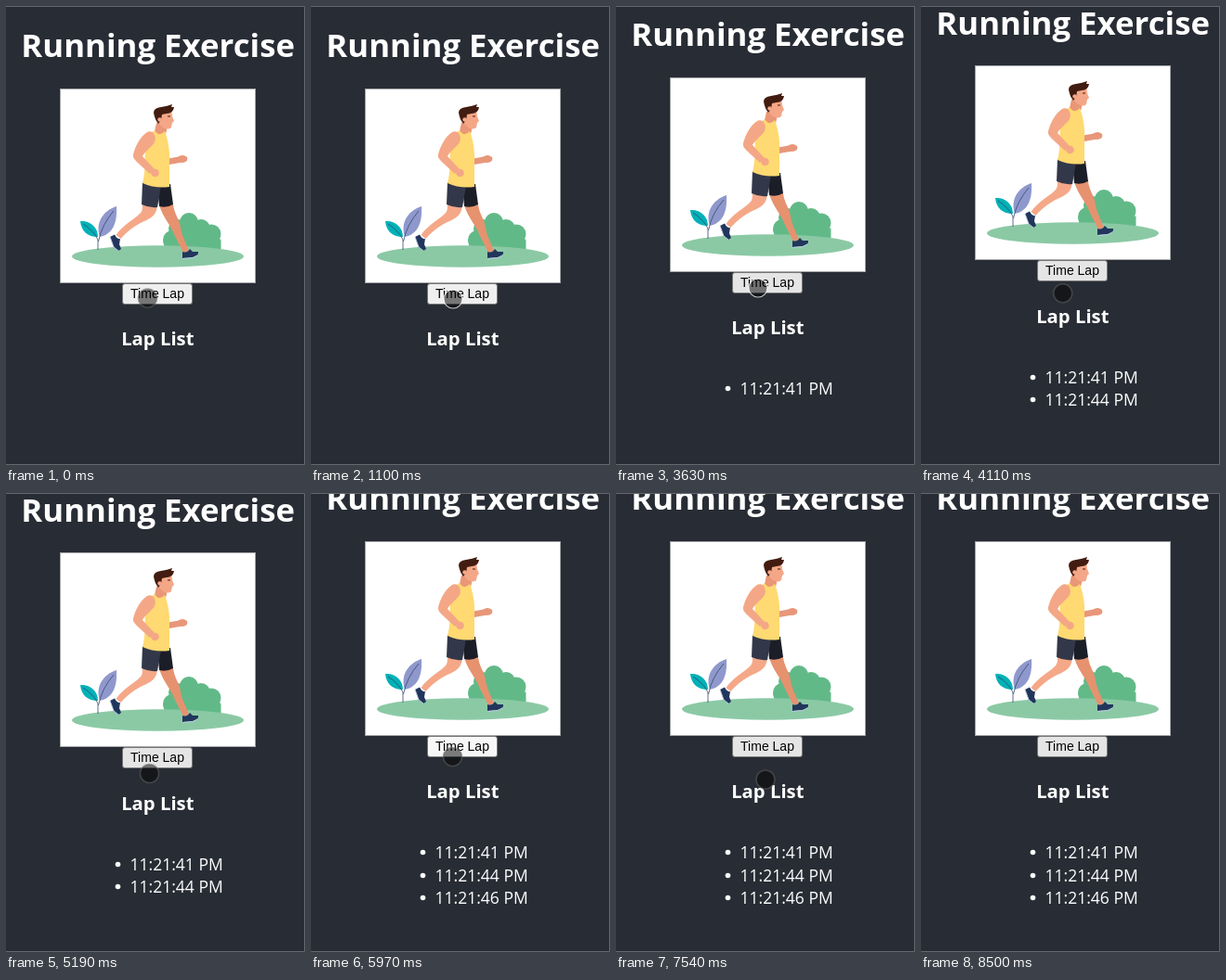
Write an HTML page that moves like this. It is 322 by 495 pixels and loops after 8990 ms.

```html
<!DOCTYPE html>
<html lang="en">
<head>
<meta charset="utf-8">
<title>Running Exercise</title>
<style>
  html, body { margin: 0; width: 100%; height: 100%; overflow: hidden; background: #282c34; }
  svg { display: block; width: 322px; height: 495px; }
  text { font-family: "Open Sans", "Noto Sans", sans-serif; fill: #fff; }
  .mid { text-anchor: middle; }
  .bold { font-weight: 700; }
  #button text { font: 14px "Liberation Sans", Arial, sans-serif; fill: #000; }
  #laps text { font-size: 17.5px; }
</style>
</head>
<body>
<svg viewBox="0 0 322 495">
  <g id="headings" class="mid bold">
    <text x="163.7" y="55" font-size="34.8">Running Exercise</text>
    <text x="163.3" y="366" font-size="20.3">Lap List</text>
  </g>

  <g id="scene">
    <rect x="58.5" y="89.5" width="210" height="209" fill="#fff" stroke="#a4a6a8"/>
    <g id="bush" fill="#62b988">
      <circle cx="179" cy="252" r="10"/><circle cx="185" cy="240" r="10"/>
      <circle cx="197" cy="233" r="10"/><circle cx="210" cy="240" r="10"/>
      <circle cx="221" cy="246" r="10.5"/>
      <path d="M169 253L185 240L197 233L210 240L221 246L231.5 252V262H171Z"/>
    </g>
    <ellipse cx="163.5" cy="270" rx="92.5" ry="11.7" fill="#8bc9a5"/>

    <g id="plant">
      <path d="M80 232C90 231 99 238 99 249C88 249 81 243 80 232Z" fill="#00b1b7"/>
      <path d="M119 216C120 232 116 246 101 249C96 234 104 221 119 216Z" fill="#8f98cc"/>
      <path d="M83 235Q95 243 99 252V263M116 221Q103 236 99.5 254" fill="none" stroke="#35496c" stroke-width=".8"/>
    </g>

    <g id="runner">
      <path d="M174 168L188 165.5" stroke="#e8977a" stroke-width="6.5" stroke-linecap="round"/>
      <path d="M185 163Q190 159 195 163Q197 168 190 169L185 168Z" fill="#e8977a"/>
      <path d="M165 215L180 214C181 224 187 230 188 239C189 247 194 256 197 264L191 266L181 246C178 237 170 230 165 215Z" fill="#e6926f"/>
      <path d="M147 213L163 215C162 226 156 229 148 232.5C138 237 131 243 123.500 251L118.500 247C126 236 138 230 143 225C147 222 147 219 147 213Z" fill="#f5a888"/>
      <path d="M163 193L177 192L180 214Q173 218 165 216Z" fill="#1b1d27"/>
      <path d="M147 190L167 194L163 217Q154 218 146 214Z" fill="#323849"/>
      <path d="M112 249L117 246.5Q120 252 123 251L122 257L124 262L121 264L116 260Z" fill="#22365c"/>
      <path d="M112 249L116 260L121 264" fill="none" stroke="#b9cbe0"/>
      <path d="M190 265Q195 267 198 262L201 265L207 265Q208 269 201 271L190 272Z" fill="#22365c"/>
      <path d="M190 272.5L201 271.5L206 269" fill="none" stroke="#b9cbe0"/>
      <path d="M162 126L174 126L173 134Q172 142 166 141Q160 139 160 135Z" fill="#e99777"/>
      <path d="M162 114L178 111L179 119L181 124L179 126L178 131Q175 134 169 131L163 125Z" fill="#f4a787"/>
      <path d="M160 134Q165 142 171 135C174 143 177 156 176 168V195Q160 197 147 191C151 176 149 164 150 153L152 140Z" fill="#ffd971"/>
      <path d="M152 136C144 141 139 152 137 160C136 164 140 167 144 171L155 181L160 176L147 162C149 157 156 153 160 147C163 140 158 133 152 136Z" fill="#f4a787"/>
      <circle cx="160.5" cy="180" r="4.3" fill="#f4a787"/>
      <path d="M159 115Q159 110 167 109Q174 108 179 106L178 109L181 109Q180 116 173 116L168 117L167 123L164 127Q160 122 159 115Z" fill="#421c10"/>
      <circle cx="165.5" cy="122.5" r="2.2" fill="#f4a787"/>
      <path d="M174 119H177" stroke="#421c10"/>
    </g>

    <g id="button">
      <rect id="face" x="125.5" y="299.5" width="75" height="22" rx="2.5" stroke="#767676"/>
      <text class="mid" x="163" y="315">Time Lap</text>
    </g>
  </g>

  <g id="laps">
    <g><circle cx="120.5" cy="-6.5" r="2.8" fill="#fff"/><text x="133.5">11:21:41 PM</text></g>
    <g><circle cx="120.5" cy="-6.5" r="2.8" fill="#fff"/><text x="133.5">11:21:44 PM</text></g>
    <g><circle cx="120.5" cy="-6.5" r="2.8" fill="#fff"/><text x="133.5">11:21:46 PM</text></g>
  </g>

  <circle id="cursor" r="10" fill="#000" fill-opacity=".5"/>
  <path d="M0 .5H321.5V494.5H0" fill="none" stroke="#65686d"/>
</svg>
<script>
const LOOP = 8990;
const $ = id => document.getElementById(id);
const lapTimes = [1300, 3750, 5970];
const hoverTimes = [1540, 3870, 6210];
const pressTimes = [1100, 3630, 5740];

// Cursor moves: first step, last step, step count, x, y, easing power
const moves = [
  [1100, 1100, 1, 153, 316, 1],
  [1300, 1300, 1, 152.5, 315, 1],
  [2900, 3380, 5, 152, 303, 1],
  [3630, 3630, 1, 153, 304, 1],
  [4110, 4470, 4, 152, 327, 1],
  [4710, 5190, 5, 154.5, 302.5, 1],
  [5290, 5530, 3, 152.5, 291, 1],
  [5740, 5970, 3, 152.5, 284.5, 1],
  [6580, 7300, 7, 158, 307, 1],
  [7540, 7540, 1, 161, 309, 1],
  [7660, 8380, 7, 227, 504.5, 1.4]
];

function cursorAt(t) {
  let x = 152.5, y = 315;
  for (const [start, end, steps, toX, toY, power] of moves) {
    if (t < start) break;
    const gap = (end - start) / (steps - 1) || 1;
    const done = Math.min(steps, Math.floor((t - start) / gap + 0.01) + 1);
    const p = (done / steps) ** power;
    x += (toX - x) * p;
    y += (toY - y) * p;
  }
  return [x, y];
}

const during = (t, from, to) => from.some((start, i) => t >= start && t < to[i]);
const place = (node, y) => node.setAttribute("transform", `translate(0 ${Math.round(y)})`);

function draw(t) {
  const laps = lapTimes.filter(time => t >= time).length;
  // The centred column rises by half a line per lap, snapped to whole pixels
  const lift = -12.25 * laps;
  place($("headings"), lift + 0.1);
  place($("scene"), lift - 0.1);
  [...$("laps").children].forEach((row, i) => {
    row.setAttribute("visibility", i < laps ? "visible" : "hidden");
    place(row, 431.1 + 24.5 * i + lift);
  });

  const active = during(t, lapTimes, hoverTimes);
  $("face").setAttribute("fill", active ? "#f7f7f7" : laps ? "#e5e5e5" : "#efefef");

  const [x, y] = cursorAt(t);
  const pressed = during(t, pressTimes, lapTimes);
  const cursor = $("cursor");
  cursor.setAttribute("cx", x);
  cursor.setAttribute("cy", y);
  cursor.setAttribute("stroke", pressed ? "rgba(255,255,255,.75)" : "rgba(100,100,100,.5)");
  cursor.setAttribute("stroke-width", pressed ? 1.2 : 1.6);
  cursor.setAttribute("visibility", t < 8500 ? "visible" : "hidden");
}

const began = performance.now();
function tick() {
  draw((performance.now() - began) % LOOP);
  requestAnimationFrame(tick);
}
tick();
</script>
</body>
</html>
```
